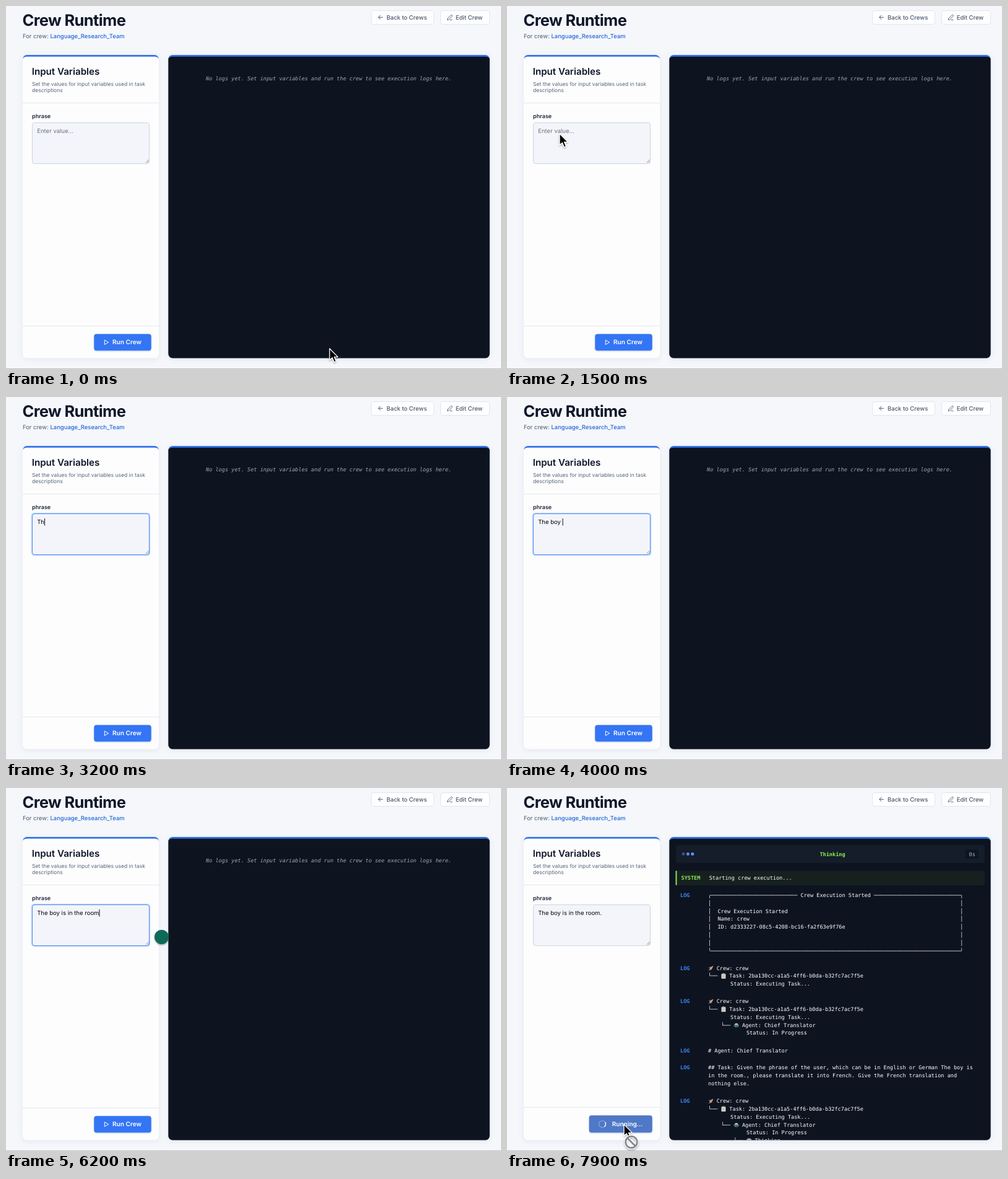
Write an HTML page that moves like this. It is 800 px wide and 586 px high and loops after 8 s.

```html
<!DOCTYPE html>
<html lang="en">
<head>
<meta charset="utf-8">
<title>Crew Runtime</title>
<style>
  html, body { margin: 0; width: 100%; height: 100%; overflow: hidden; background: #f5f7fb; }
  #stage { position: absolute; left: 0; top: 0; width: 800px; height: 586px; overflow: hidden; background: #f5f7fb; }
  #stage div { position: absolute; box-sizing: border-box; }
  svg { position: absolute; left: 0; top: 0; }
  text { font-family: Inter, "Liberation Sans", sans-serif; white-space: pre; text-rendering: geometricPrecision; }
  .mono text, text.mono { font-family: "DejaVu Sans Mono", "Liberation Mono", monospace; font-size: 8.57px; }
  .bold { font-weight: 700; }
  .panel { filter: drop-shadow(0 2px 5px rgba(30, 50, 90, .08)); }
  .line { left: 27px; width: 220px; height: 1px; background: #e3e8f0; }
  .ghost { top: 7px; height: 23px; background: #fefeff; border: 1px solid #e1e6ef; border-radius: 4px; }
  #field { left: 42px; top: 188px; width: 190px; height: 67px; background: #f3f5fa; border: 1px solid #cbd5e1; border-radius: 4px; }
  #field.focus { border-color: #4c8af0; box-shadow: 0 0 0 1.5px rgba(59, 130, 246, .25); }
  .button { filter: drop-shadow(0 1px 1px rgba(40, 90, 200, .3)); }
</style>
</head>
<body>
<div id="stage">
  <svg width="800" height="586" viewBox="0 0 800 586">
    <g class="panel">
      <path d="M27 86a7 7 0 0 1 7-7h206a7 7 0 0 1 7 7Z" fill="#3273ea"/>
      <path d="M27 86a7 4.2 0 0 1 7-4.2h206a7 4.2 0 0 1 7 4.2v475.6a7 7 0 0 1-7 7h-206a7 7 0 0 1-7-7Z" fill="#fdfdfe"/>
    </g>
    <g class="panel">
      <path d="M262.3 86a7 7 0 0 1 7-7h505.4a7 7 0 0 1 7 7Z" fill="#3273ea"/>
      <path d="M262.3 86a7 4.2 0 0 1 7-4.2h505.4a7 4.2 0 0 1 7 4.2v475.6a7 7 0 0 1-7 7h-505.4a7 7 0 0 1-7-7Z" fill="#0d1420"/>
    </g>
  </svg>
  <div class="line" style="top:156px"></div>
  <div class="line" id="foot" style="top:516px"></div>
  <div class="ghost" style="left:589.5px;width:102px"></div>
  <div class="ghost" style="left:701.5px;width:80.5px"></div>
  <div id="field"></div>
  <div style="left:0;top:585px;width:800px;height:1px;background:#bfc1c7"></div>

  <svg width="800" height="586" viewBox="0 0 800 586">
    <defs>
      <clipPath id="clip"><rect x="262" y="82" width="520" height="486.6" rx="6"/></clipPath>
      <filter id="shade" x="-50%" y="-50%" width="200%" height="200%">
        <feDropShadow dx="0" dy="1.5" stdDeviation="1.3" flood-color="#000" flood-opacity=".35"/>
      </filter>
      <g id="rocket">
        <path d="M.6 4.2 3.4 2 6 3.4 6.6 6 4.4 8.2 3.8 5.8Z" fill="#a8563c"/>
        <path d="M2.4 6.2Q3.6 2.4 8.2.8 7.6 5 3.6 7.4Z" fill="#b9a79c"/>
        <path d="M.6 8.4 2.2 6.4 3.3 7.5Z" fill="#f0a33c"/>
      </g>
      <g id="board">
        <rect x=".6" y=".6" width="7.4" height="8.2" rx=".8" fill="#9a7a5a"/>
        <rect x="1.2" y="1.5" width="6.2" height="6.8" fill="#dfe2e6"/>
        <path d="M2.3 3.5h4M2.3 5h4M2.3 6.5h4" stroke="#8b929c" stroke-width=".6"/>
        <rect x="2.7" y="0" width="3.2" height="1.7" fill="#aab0b8"/>
      </g>
      <g id="bot">
        <path d="M1.4 4.4Q1.6 1.4 4.4 1.4T7.4 4.4Z" fill="#c3cbd2"/>
        <rect x="1.2" y="4" width="6.4" height="3.9" rx="1.2" fill="#4f7f84"/>
        <path d="M.7 4v2M8.1 4v2" stroke="#5f9c98" stroke-width=".8"/>
        <path d="M2.8 6.6h3.2" stroke="#223c44" stroke-width=".8"/>
      </g>
      <ellipse id="mind" cx="4.3" cy="4.3" rx="4.2" ry="3.7" fill="#a9b0bb"/>
    </defs>

    <text class="bold" x="26.5" y="31.5" font-size="25.5" letter-spacing="-.64" fill="#0f172a">Crew Runtime</text>
    <text x="27" y="51.5" font-size="9.45" fill="#4b5a70">For crew: </text>
    <text x="71.5" y="51.5" font-size="9.45" font-weight="500" fill="#2166d8">Language_Research_Team</text>
    <g font-size="9.5" font-weight="500" fill="#4a586d">
      <text x="615" y="21.8">Back to Crews</text>
      <text x="726.7" y="21.8">Edit Crew</text>
    </g>
    <g fill="none" stroke="#4a586d" stroke-linecap="round" stroke-linejoin="round">
      <path d="M608.5 18.3h-6.6m3.2-3.2-3.2 3.2 3.2 3.2"/>
      <path d="M713.3 22.3l.6-2.4 5.2-5.2q1-.7 1.8.1.7.8 0 1.7l-5.2 5.2ZM717.8 22.4h3.2" stroke-width=".9"/>
    </g>

    <text x="41.7" y="111.3" font-size="15.15" font-weight="600" fill="#0f172a">Input Variables</text>
    <g font-size="8.54" fill="#56647a">
      <text x="42" y="128.6">Set the values for input variables used in task</text>
      <text x="42" y="138.8">descriptions</text>
    </g>
    <text x="42" y="180.5" font-size="9.05" font-weight="600" fill="#1b2438">phrase</text>
    <text id="hint" x="50.2" y="205.2" font-size="9.54" fill="#6d737d">Enter value...</text>
    <text id="typed" x="50.2" y="205.2" font-size="9.54" fill="#05070c"></text>
    <rect id="caret" y="196" width="1" height="11.5" fill="#0b0f18"/>
    <path d="M225.8 253l5-5M228.8 253l2-2" stroke="#70757d" stroke-width=".8"/>

    <g fill="#fff" font-size="10.08" font-weight="600">
      <g id="idle">
        <rect class="button" x="142.3" y="529.4" width="92.4" height="26.9" rx="4" fill="#3375f4"/>
        <path d="M159.3 539.2v7.4l6.3-3.7Z" fill="none" stroke="#fff" stroke-linejoin="round"/>
        <text x="172" y="546.3">Run Crew</text>
      </g>
      <g id="busy">
        <rect class="button" x="132.7" y="528.4" width="102" height="27.9" rx="4" fill="#4f78c6"/>
        <circle cx="154" cy="542.5" r="5.5" fill="none" stroke="#fff" stroke-opacity=".35" stroke-width="1.2"/>
        <path id="spin" d="M148.5 542.5a5.5 5.5 0 0 1 5.5-5.5" fill="none" stroke="#fff" stroke-width="1.3"/>
        <text x="169.7" y="546.3">Running...</text>
      </g>
    </g>

    <text class="mono" id="empty" x="323" y="119.6" font-style="italic" fill="#a0a8b6">No logs yet. Set input variables and run the crew to see execution logs here.</text>

    <g id="status" class="mono">
      <rect x="273" y="92" width="499" height="29" rx="4" fill="#151c2a"/>
      <circle cx="285" cy="106.4" r="2.4" fill="#3b5688"/>
      <circle cx="292.4" cy="106.4" r="2.5" fill="#5688e6"/>
      <circle cx="299.8" cy="106.4" r="2.5" fill="#5b95fa"/>
      <text class="bold" x="505.4" y="109.5" fill="#8cf04f">Thinking</text>
      <rect x="741" y="99" width="21" height="15" rx="3" fill="#0e1522"/>
      <text x="746.5" y="109.6" fill="#a8b0bd">0s</text>
      <rect x="272.5" y="133.5" width="499.5" height="23.5" rx="3" fill="#16211f"/>
      <rect x="272.5" y="133.5" width="2" height="23.5" rx="1" fill="#86e35a"/>
      <text class="bold" x="281.5" y="148" fill="#8ee65c">SYSTEM</text>
      <text x="326.7" y="148" fill="#fff">Starting crew execution...</text>
    </g>
    <g id="entries" class="mono" fill="#fff" clip-path="url(#clip)"></g>

    <circle id="badge" cx="251.5" cy="240.5" r="11.5" fill="#0c6b59" filter="url(#shade)"/>

    <g id="pointer">
      <path id="arrow" d="M0 0V18.6L4.3 14.7 7.4 21.8 10.5 20.5 7.5 13.6H13.4Z" fill="#000" stroke="#fff" stroke-width="1.3" stroke-linejoin="round" filter="url(#shade)"/>
      <g id="beam" fill="none" stroke-linecap="round">
        <path d="M-3.5-9.3Q0-9.3 0-6.8V7Q0 9.5-3.5 9.5M3.5-9.3Q0-9.3 0-6.8M0 7Q0 9.5 3.5 9.5M-2 1h4" stroke="#fff" stroke-width="3"/>
        <path d="M-3.5-9.3Q0-9.3 0-6.8V7Q0 9.5-3.5 9.5M3.5-9.3Q0-9.3 0-6.8M0 7Q0 9.5 3.5 9.5M-2 1h4" stroke="#000" stroke-width="1.5"/>
      </g>
      <g id="deny" fill="none">
        <circle cx="12" cy="28.6" r="9.3" stroke="#fff" stroke-width="5" filter="url(#shade)"/>
        <path d="M6 22.6l12 12" stroke="#fff" stroke-width="5"/>
        <circle cx="12" cy="28.6" r="9.3" stroke="#85888d" stroke-width="2.8"/>
        <path d="M5.6 22.2l12.8 12.8" stroke="#85888d" stroke-width="2.8"/>
      </g>
    </g>
  </svg>
</div>

<script>
const LOOP = 8000, FOCUS = 1900, TYPE = 3000, BADGE = 4500, RUN = 7500, STATUS = 7700, LOGS = 7800;
const PHRASE = 'The boy is in the room.';
const $ = id => document.getElementById(id);
const show = (id, on) => { $(id).style.display = on ? '' : 'none'; };

// Log entries: rows hold [column, text] or [column, text, icon, label].
const COL = 5.16, ROW = 12.8, LEFT = 325;
const ID = '2ba130cc-a1a5-4ff6-b0da-b32fc7ac7f5e';
const dash = n => '─'.repeat(n);
const boxed = s => [0, '│' + ('  ' + s).padEnd(78) + '│'];
const task = [
  [0, '', 'rocket', 'Crew: crew'],
  [0, '└── ', 'board', 'Task: ' + ID],
  [7, 'Status: Executing Task...']
];
const agent = [
  [4, '└── ', 'bot', 'Agent: Chief Translator'],
  [12, 'Status: In Progress']
];
const entries = [
  [176, [
    [0, '╭' + dash(27) + ' Crew Execution Started ' + dash(27) + '╮'],
    boxed(''), boxed('Crew Execution Started'), boxed('Name: crew'),
    boxed('ID: d2333227-08c5-4208-bc16-fa2f63e9f76e'), boxed(''), boxed(''),
    [0, '╰' + dash(78) + '╯']
  ]],
  [293.6, task],
  [347.2, [...task, ...agent]],
  [426.6, [[0, '# Agent: Chief Translator']]],
  [454.2, [
    [0, '## Task: Given the phrase of the user, which can be in English or German The boy is'],
    [0, 'in the room., please translate it into French. Give the French translation and'],
    [0, 'nothing else.']
  ]],
  [508.2, [...task, ...agent, [8, '└── ', 'mind', 'Thinking...']]]
];

function add(tag, attrs, text = '') {
  const el = document.createElementNS('http://www.w3.org/2000/svg', tag);
  for (const k in attrs) el.setAttribute(k, attrs[k]);
  el.textContent = text;
  $('entries').append(el);
}

for (const [top, rows] of entries) {
  add('text', { x: 280, y: top, class: 'bold', fill: '#3f82f3' }, 'LOG');
  rows.forEach(([col, text, icon, label], i) => {
    const x = LEFT + col * COL, y = top + i * ROW;
    add('text', { x, y }, text);
    if (!icon) return;
    const end = x + text.length * COL;
    add('use', { href: '#' + icon, transform: `translate(${end} ${y - 7.3})` });
    add('text', { x: end + 13.7, y }, label);
  });
}

const path = [[0, 523, 553], [300, 523, 553], [1200, 85, 206], [1600, 85, 206], [1800, 83, 204],
  [6600, 83, 204], [7200, 159, 498], [7450, 189, 543], [LOOP, 189, 543]];

function pointerAt(t) {
  const i = path.findIndex(p => p[0] > t);
  const [t0, x0, y0] = path[i - 1], [t1, x1, y1] = path[i];
  const u = (t - t0) / (t1 - t0), k = u * u * (3 - 2 * u);
  return [x0 + (x1 - x0) * k, y0 + (y1 - y0) * k];
}

function typedCount(t) {
  if (t < TYPE) return 0;
  if (t < 4450) return Math.min(8, 1 + Math.floor((t - TYPE) / 130));
  if (t < 6350) return Math.min(22, 9 + Math.floor((t - 4450) / 125));
  return 23;
}

function render(t) {
  const n = typedCount(t), busy = t >= RUN, focus = t >= FOCUS && !busy;
  $('typed').textContent = PHRASE.slice(0, n);
  show('hint', n === 0);
  $('field').className = focus ? 'focus' : '';

  const since = t < TYPE ? t - FOCUS : t < 6350 ? 0 : t - 6350;
  show('caret', focus && since % 1000 < 500);
  $('caret').setAttribute('x', 50.2 + (n ? $('typed').getComputedTextLength() : 0));
  show('badge', t >= BADGE && !busy);

  $('foot').style.top = busy ? '515px' : '516px';
  show('idle', !busy);
  show('busy', busy);
  $('spin').setAttribute('transform', `rotate(${(t - RUN) * .36} 154 542.5)`);
  show('empty', t < STATUS);
  show('status', t >= STATUS);
  show('entries', t >= LOGS);

  const [x, y] = pointerAt(t);
  const beam = t >= 1700 && t < 6750;
  $('pointer').setAttribute('transform', `translate(${x} ${y})`);
  show('pointer', t < TYPE || t >= 6600);
  show('arrow', !beam);
  show('beam', beam);
  show('deny', busy);
}

const start = performance.now();
function tick() {
  render((performance.now() - start) % LOOP);
  requestAnimationFrame(tick);
}
tick();
</script>
</body>
</html>
```
